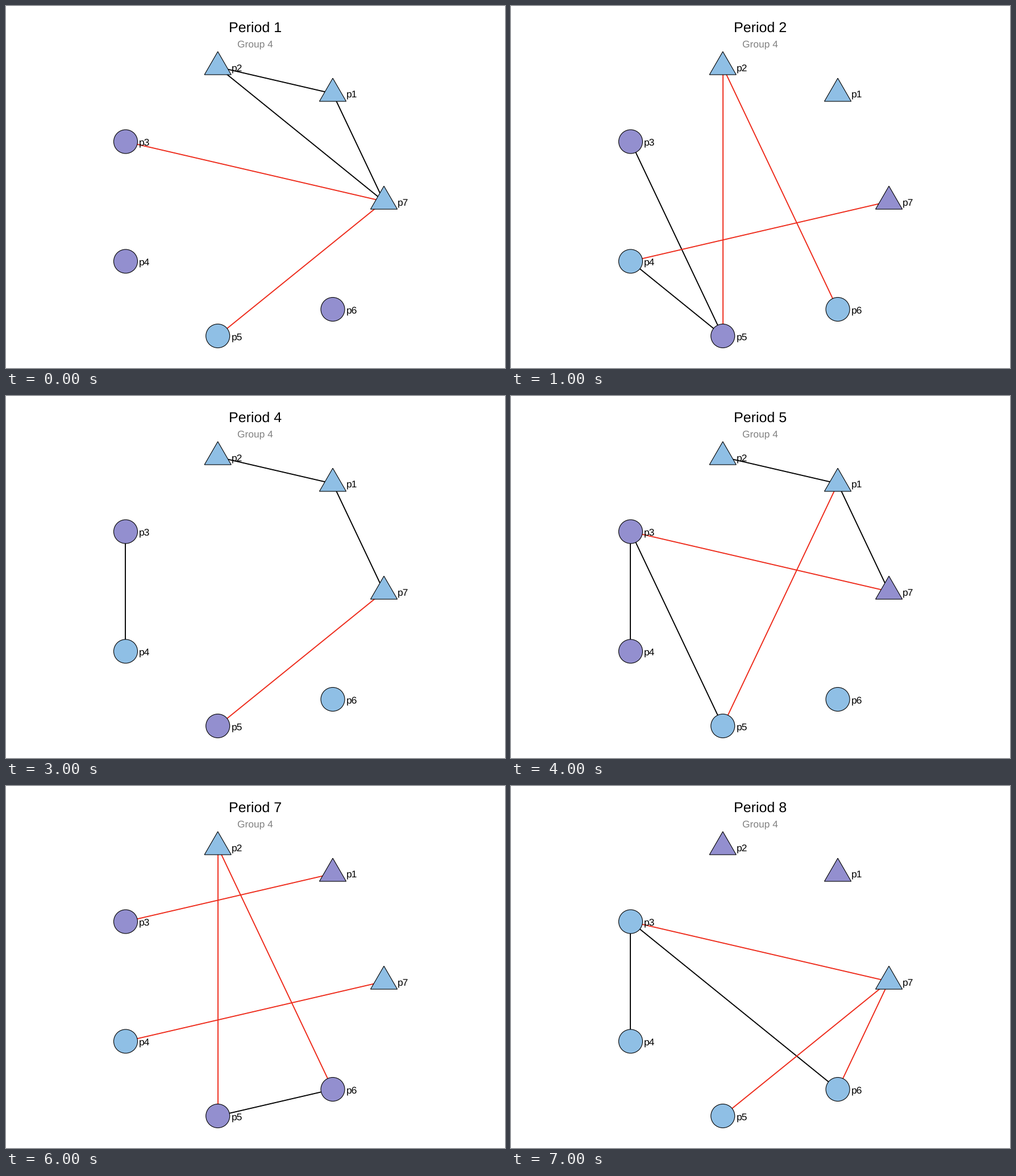
Write a matplotlib script that moves like this. It is 878 px wide and 638 px high and loops after 8000 ms.

```python
import math

import matplotlib.pyplot as plt
from matplotlib.animation import FuncAnimation
from matplotlib.patches import Circle, Polygon

W, H, DPI = 878, 638, 64
PT = 72 / DPI  # points per pixel

BLUE, PURPLE = "#8fbfe5", "#938fcf"
BLACK, RED, GRAY = "#000000", "#ee2a1a", "#808080"
FILL = {"b": BLUE, "p": PURPLE}
TRIANGLES = {1, 2, 7}

# Fill of nodes 1..7, then the linked pairs, for each period
PERIODS = [
    ("bbppbpb", "12 27 17 37 57"),
    ("bbpbpbp", "35 45 25 26 47"),
    ("pbbppbp", "12 17 34 36 25 13 14 16 47 67"),
    ("bbpbpbb", "12 17 34 57"),
    ("bbppbbp", "12 17 34 35 37 15"),
    ("pbbbpbb", "12 34 25"),
    ("pbpbppb", "13 25 26 47 56"),
    ("ppbbbbb", "34 36 37 57 67"),
]

plt.rcParams["font.family"] = "Liberation Sans"
plt.rcParams["text.hinting"] = "none"

fig = plt.figure(figsize=(W / DPI, H / DPI), dpi=DPI, facecolor="white")
ax = fig.add_axes([0, 0, 1, 1])
ax.set_xlim(0, W)
ax.set_ylim(H, 0)
ax.axis("off")


def ring(k):
    """Place of node k on the slightly squeezed heptagon."""
    a = 2 * math.pi * k / 7
    return 425.9 + 239.1 * math.cos(a), 344.5 - 243.1 * math.sin(a)


POS = {k: ring(k) for k in range(1, 8)}


def label(x, y, text, size, color=BLACK, ha="left"):
    return ax.text(x, y, text, fontsize=size * PT, color=color, ha=ha,
                   va="baseline", zorder=3)


def make_node(k):
    x, y = POS[k]
    style = dict(ec=BLACK, lw=1.1 * PT, zorder=2)
    if k in TRIANGLES:
        r = 27.2
        corners = [(x + r * math.sin(t), y - r * math.cos(t))
                   for t in (0, 2 * math.pi / 3, 4 * math.pi / 3)]
        node = Polygon(corners, joinstyle="miter", **style)
    else:
        node = Circle((x, y), 21, **style)
    label(x + 23.7, y + 7.5, f"p{k}", 17.4)
    return ax.add_patch(node)


def make_edge(a, b):
    same = (a in TRIANGLES) == (b in TRIANGLES)
    (x0, y0), (x1, y1) = POS[a], POS[b]
    line, = ax.plot([x0, x1], [y0, y1], color=BLACK if same else RED,
                    lw=1.9 * PT, zorder=1 if same else 1.1)
    return line


title = label(438.7, 46, "", 25, ha="center")
label(438.7, 73, "Group 4", 17.4, GRAY, "center")
nodes = [make_node(k) for k in range(1, 8)]
edges = {f"{a}{b}": make_edge(a, b)
         for a in range(1, 8) for b in range(a + 1, 8)}


def draw(i):
    fills, links = PERIODS[i]
    title.set_text(f"Period {i + 1}")
    for node, c in zip(nodes, fills):
        node.set_facecolor(FILL[c])
    shown = links.split()
    for pair, line in edges.items():
        line.set_visible(pair in shown)
    return [title, *nodes, *edges.values()]


anim = FuncAnimation(fig, draw, frames=len(PERIODS), interval=1000,
                     repeat=True, repeat_delay=0, blit=False)
plt.show()
```
